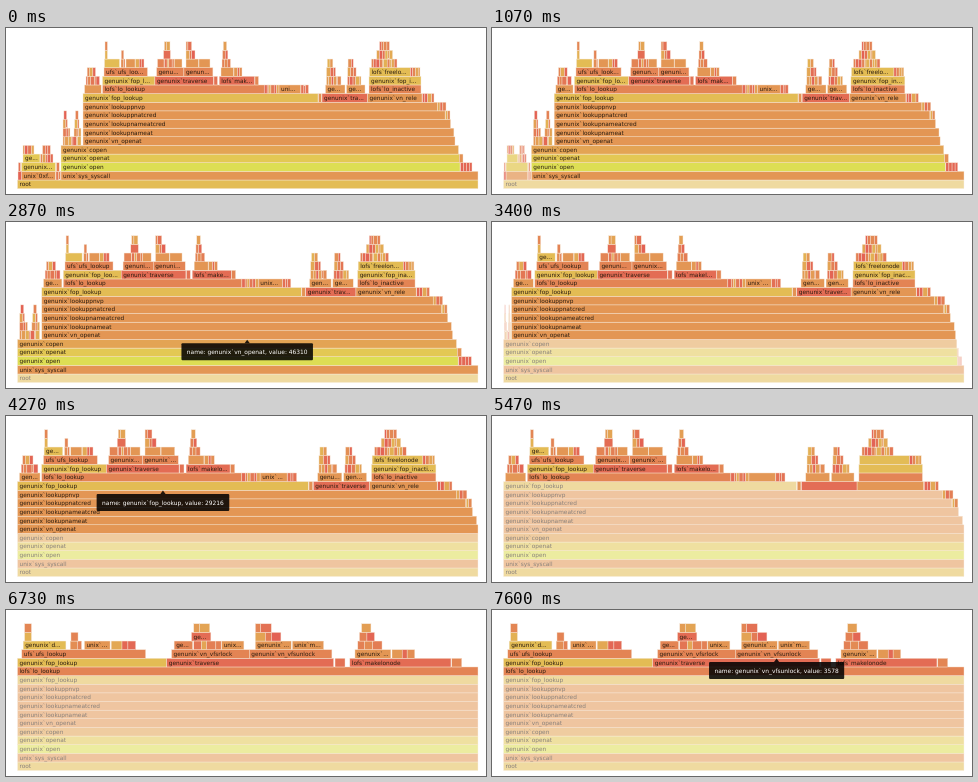
Recreate the animation shown at these times as an HTML page. Size 480 by 166 pixels, loop 8000 ms.

```html
<!DOCTYPE html>
<html lang="en">
<head>
<meta charset="utf-8">
<title>Flame graph</title>
<style>
  html, body { margin: 0; width: 100%; height: 100%; overflow: hidden; background: #fff; }
  svg { display: block; width: 100vw; height: 100vh; font: 5.8px "DejaVu Sans", Verdana, sans-serif; }
  .bar { stroke: #f5e6d6; stroke-width: .42; }
  text { fill: #2a1c10; white-space: pre; }
  #tip { fill: #000; fill-opacity: .86; }
  #tip text { fill: #fff; fill-opacity: 1; font-size: 5.92px; text-anchor: middle; }
</style>
</head>
<body>
<svg viewBox="0 0 480 166">
  <g id="chart"></g>
  <g id="tip"><rect height="17" rx="1"/><path/><text></text></g>
</svg>
<script>
const LOOP = 8000, ZOOM = 750;
const LEFT = 11.5, WIDTH = 460.5, PITCH = 8.64, BASE = 152, MIN_LABEL = 16.8;
const NS = "http://www.w3.org/2000/svg";
const chart = document.getElementById("chart");
const tip = document.getElementById("tip");
const [tipBox, tipArrow, tipText] = tip.children;

let seed = 11;
const rnd = () => (seed = seed * 16807 % 2147483647) / 2147483647;

function make(tag, parent, attrs) {
  const el = document.createElementNS(NS, tag);
  for (const k in attrs) el.setAttribute(k, attrs[k]);
  parent.append(el);
  return el;
}

// Green channel by kind of call
const tones = [
  [/`open$/, 222],
  [/`(openat|close|fstat)/, 200],
  [/fop_|freelo|dnlc|root/, 188],
  [/traverse|makelo|cv_/, 108],
  [/copen/, 164],
  [/^lofs|^ufs|vfs/, 132],
  [/./, 150]
];
const tone = label => tones.find(([re]) => re.test(label))[1];

const bars = [];
function bar(row, a, b, label, green = tone(label)) {
  const y = BASE - row * PITCH, g = make("g", chart, {});
  const fill = `rgb(${green > 210 ? 221 : 227},${green},84)`;
  const rect = make("rect", g, { class: "bar", y, height: PITCH, fill });
  const text = label && make("text", g, { y: y + 6.35 });
  bars.push({ row, a, b, label, g, rect, text });
}

// Calls on top of each other; trim(i) is how much the i-th loses on the right
function stack(row, a, b, labels, trim = () => 0) {
  labels.split(" ").forEach((s, i) => bar(row + i, a, b - trim(i), s));
}

// Unlabelled slivers in rows that narrow towards the top
function peak(row, a, b, levels = 1) {
  for (; levels > 0; levels--, row++) {
    const n = Math.max(1, Math.round((b - a) / 2.6));
    const cuts = Array.from({ length: n + 1 }, (_, i) => i && i < n ? i + .7 * (rnd() - .5) : i);
    const x = i => a + (b - a) * cuts[i] / n;
    for (let i = 0; i < n; i++) bar(row, x(i), x(i + 1), "", 98 + 80 * rnd() ** 1.4);
    const w = (b - a) * .62;
    a += (b - a - w) * rnd() * .6;
    b = a + w;
  }
}

stack(0, 11.5, 472, "root");
stack(1, 55, 472, "unix`sys_syscall");
stack(2, 55, 454, "genunix`open genunix`openat genunix`copen", i => .75 * i);
stack(5, 77, 449,
  "genunix`vn_openat genunix`lookupnameat genunix`lookupnameatcred genunix`lookuppnatcred genunix`lookuppnvp",
  i => 1.1 * i * i);
stack(10, 77, 312, "genunix`fop_lookup");

// Left shoulder
stack(1, 15.5, 49.5, "unix`0xfffffffffb800c86 genunix`close");
stack(3, 17, 33.9, "genunix`fstat");
peak(1, 12, 15.5, 2);
peak(1, 50, 54.5, 2);
peak(3, 34.5, 47, 2);
peak(4, 17, 28);
peak(5, 57, 75);
peak(6, 57, 64, 3);
peak(6, 68, 75, 3);
stack(11, 78.6, 95.2, "genunix`vn_setpath");
peak(12, 80, 93.5, 2);

// Under lo_lookup
stack(11, 96.5, 258.2, "lofs`lo_lookup");
stack(12, 96.5, 148.9, "genunix`fop_lookup");
stack(13, 98, 141.5, "ufs`ufs_lookup");
stack(14, 98.5, 113.5, "genunix`dnlc_lookup");
stack(14, 120, 129, "unix`rw_enter");
peak(15, 99, 101.4);
peak(16, 99, 101.4);
peak(14, 115, 119, 2);
peak(14, 129.4, 138);

stack(12, 148.9, 207.5, "genunix`traverse");
stack(13, 150.6, 177.9, "genunix`vn_vfsrlock");
stack(14, 151.5, 158, "genunix`vfs_rlock");
stack(15, 157.6, 164.4, "genunix`cv_broadcast");
stack(14, 168.2, 176, "unix`mutex_exit");
peak(14, 158.4, 168);
peak(16, 158.4, 164);
stack(13, 177.9, 206.9, "genunix`vn_vfsunlock");
stack(14, 180, 192.6, "genunix`rwst_exit");
stack(14, 193, 204, "unix`mutex_enter");
peak(15, 180, 189, 2);
peak(12, 208, 211.5);

stack(12, 213.2, 248.7, "lofs`makelonode");
stack(13, 215, 227.6, "genunix`kmem_alloc");
peak(13, 228, 236);
peak(14, 216, 224.5, 3);
peak(12, 249, 252.5);

// Right of lo_lookup
peak(11, 258.2, 273);
stack(11, 273, 294.8, "unix`mutex_enter");
peak(11, 295, 302.5);
peak(10, 312.5, 315.5);
stack(10, 316, 361.5, "genunix`traverse");
stack(11, 319.5, 339, "genunix`vn_lock");
stack(11, 340.5, 359, "genunix`vn_unlock");
peak(12, 320.5, 335, 3);
peak(12, 341.5, 355, 3);
stack(10, 361.5, 416, "genunix`vn_rele");
stack(11, 363, 415, "lofs`lo_inactive genunix`fop_inactive");
stack(13, 363.5, 404.5, "lofs`freelonode");
peak(13, 404.5, 414);
peak(14, 365.5, 391, 3);

// Right slope
peak(10, 416.5, 428);
peak(9, 431.5, 440);
peak(8, 439.5, 444);
peak(2, 454.5, 466);
peak(3, 453.3, 457);

const find = label => bars.find(n => n.label === label);

const zooms = [
  [-ZOOM, "root"],
  [735, "unix`sys_syscall"],
  [2978, "genunix`vn_openat"],
  [5360, "lofs`lo_lookup"]
].map(([t, label]) => [t, find(label)]);

// from, to, label, value
const tips = [
  [330, 735, "unix`sys_syscall", 51907],
  [1870, 2330, "genunix`open", 49669],
  [2330, 2540, "genunix`copen", 49482],
  [2540, 2978, "genunix`vn_openat", 46310],
  [4000, 4800, "genunix`fop_lookup", 29216],
  [4800, 5360, "lofs`lo_lookup", 20131],
  [7130, LOOP, "genunix`vn_vfsunlock", 3578]
];

const ink = document.createElement("canvas").getContext("2d");
ink.font = '58px "DejaVu Sans", Verdana, sans-serif';
const measure = s => ink.measureText(s).width / 10;

function fit(label, room) {
  if (measure(label) <= room) return label;
  let n = label.length - 1;
  while (n > 2 && measure(label.slice(0, n) + "...") > room) n--;
  return label.slice(0, n) + "...";
}

const ease = u => u < .5 ? 4 * u ** 3 : 1 - 4 * (1 - u) ** 3;
const place = (x, view) =>
  LEFT + WIDTH * Math.min(1, Math.max(0, (x - view.a) / (view.b - view.a)));

function drawBar(n, at, view, e) {
  const x = at(n.a), w = at(n.b) - x;
  const shown = w > .05;
  n.g.setAttribute("display", shown ? "inline" : "none");
  if (!shown) return;
  const parent = n.row < view.row && n.a <= view.a && n.b >= view.b;
  const leaving = n.b <= view.a || n.a >= view.b;
  n.g.setAttribute("opacity", parent ? .55 : leaving ? 1 - .8 * e : 1);
  n.rect.setAttribute("x", x);
  n.rect.setAttribute("width", w);
  if (!n.text) return;
  n.text.setAttribute("x", x + 2);
  n.text.textContent = leaving || w < MIN_LABEL ? "" : fit(n.label, w - 4);
}

function drawTip(t, at) {
  const hit = tips.find(p => t >= p[0] && t < p[1]);
  tip.setAttribute("display", hit ? "inline" : "none");
  if (!hit) return;
  const [, , label, value] = hit, n = find(label);
  const s = `name: ${label}, value: ${value}`;
  const mid = (at(n.a) + at(n.b)) / 2, y = BASE - (n.row - 1) * PITCH;
  const w = measure(s) * 5.92 / 5.8 + 10.5;
  tipBox.setAttribute("x", mid - w / 2);
  tipBox.setAttribute("y", y + 3.8);
  tipBox.setAttribute("width", w);
  tipArrow.setAttribute("d", `M${mid} ${y + .3}l2.6 3.5h-5.2z`);
  tipText.setAttribute("x", mid);
  tipText.setAttribute("y", y + 14.4);
  tipText.textContent = s;
}

function draw(t) {
  const i = zooms.findLastIndex(z => t >= z[0]);
  const [start, view] = zooms[i];
  const prev = zooms[Math.max(0, i - 1)][1];
  const e = ease(Math.min(1, (t - start) / ZOOM));
  const at = x => place(x, prev) + (place(x, view) - place(x, prev)) * e;
  for (const n of bars) drawBar(n, at, view, e);
  drawTip(t, at);
}

const began = performance.now();
function tick() {
  draw((performance.now() - began) % LOOP);
  requestAnimationFrame(tick);
}
tick();
</script>
</body>
</html>
```
